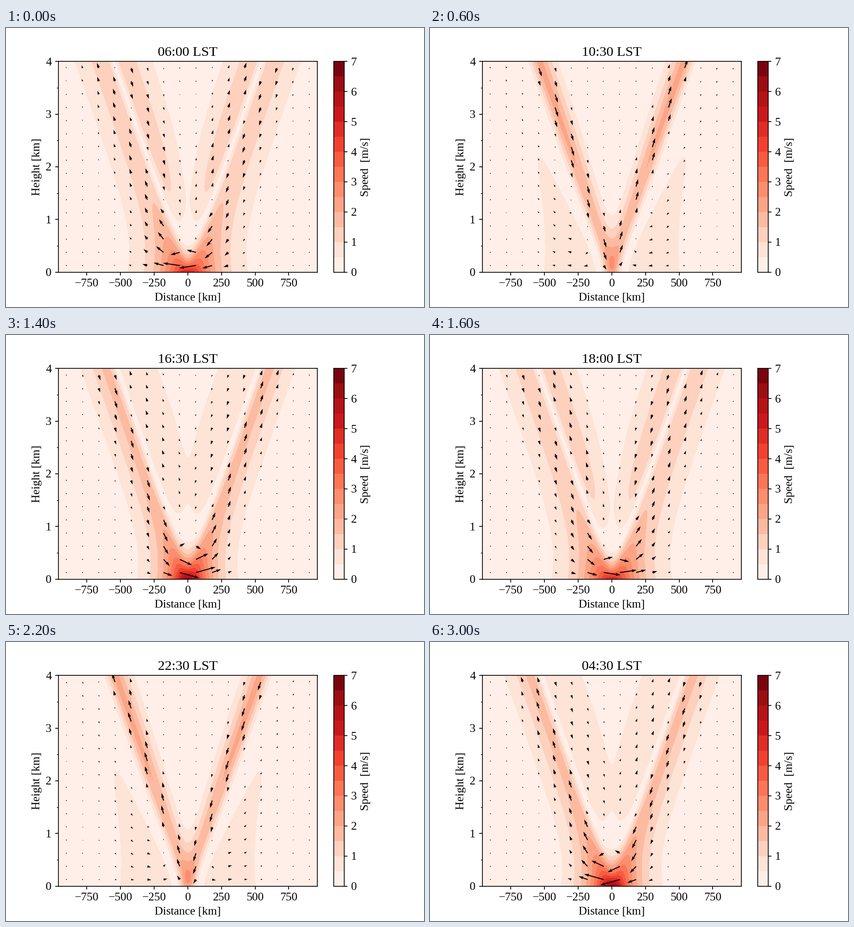
These frames come from a looping animation (917x611 px, 3200 ms). A matplotlib script:

```python
"""Linear sea/land breeze at the equator: wave beams over one diurnal cycle."""
import numpy as np
import matplotlib.pyplot as plt
from matplotlib.animation import FuncAnimation
from matplotlib.ticker import MultipleLocator

plt.rcParams.update({
    "font.family": "Liberation Serif",
    "font.size": 12,
})

# Physical constants (SI)
OMEGA = 2 * np.pi / 86400   # diurnal frequency
N = 0.01                    # buoyancy frequency
H = 1000.0                  # heating depth
L = 50e3                    # coastal transition width
Q0 = 1.2e-5                 # heating amplitude

XS = N * H / OMEGA          # horizontal scale
FRAMES = 16
START, STEP = 6.0, 1.5      # local time and step in hours
SKIP = slice(5, None, 10)   # arrow spacing on the grid


def breeze(x, z):
    """Complex amplitudes of u and w on the scaled grid (x, z)."""
    dk = 0.02
    k = (np.arange(2500) + 0.5) * dk
    amp = Q0 / (np.pi * OMEGA * N) * np.exp(-k * L / XS) / (1 + k**2) * dk
    forced = np.exp(-z)[:, None]
    wave = np.exp(1j * np.outer(z, k))
    u = (forced + 1j * k * wave) * amp @ np.cos(np.outer(k, x))
    w = (wave - forced) * k * amp @ np.sin(np.outer(k, x)) * OMEGA / N
    return u, w


x = np.linspace(-7, 7, 161)
z = np.linspace(0, 4, 161)
U, W = breeze(x, z)
X, Z = x * XS / 1000, z * H / 1000
LEVELS = np.arange(0, 7.5, 0.5)


def winds(hour):
    turn = np.exp(1j * OMEGA * (hour - 12) * 3600)
    return (U * turn).imag, (W * turn).imag


def shade(u, w):
    return ax.contourf(X, Z, np.hypot(u, w), levels=LEVELS, cmap="Reds")


fig, ax = plt.subplots(figsize=(6.0033, 4), dpi=152.75)
fig.subplots_adjust(left=0.125, right=0.9, bottom=0.125, top=0.88)

u, w = winds(START)
fill = shade(u, w)
arrows = ax.quiver(X[SKIP], Z[SKIP], u[SKIP, SKIP], w[SKIP, SKIP],
                   angles="xy", scale=15, scale_units="inches", zorder=2)
bar = fig.colorbar(fill, ax=ax, ticks=range(8))
bar.minorticks_off()
bar.set_label("Speed  [m/s]")

ax.set(xlim=(X[0], X[-1]), ylim=(0, 4),
       xticks=range(-750, 751, 250), yticks=range(5),
       xlabel="Distance [km]", ylabel="Height [km]")
ax.yaxis.set_minor_locator(MultipleLocator(0.5))
title = ax.set_title("")


def update(i):
    global fill
    hour = (START + STEP * i) % 24
    u, w = winds(hour)
    fill.remove()
    fill = shade(u, w)
    arrows.set_UVC(u[SKIP, SKIP], w[SKIP, SKIP])
    title.set_text(f"{int(hour):02d}:{int(hour % 1 * 60):02d} LST")
    return fill, arrows, title


anim = FuncAnimation(fig, update, frames=FRAMES, interval=200, repeat=True)

plt.show()
```
